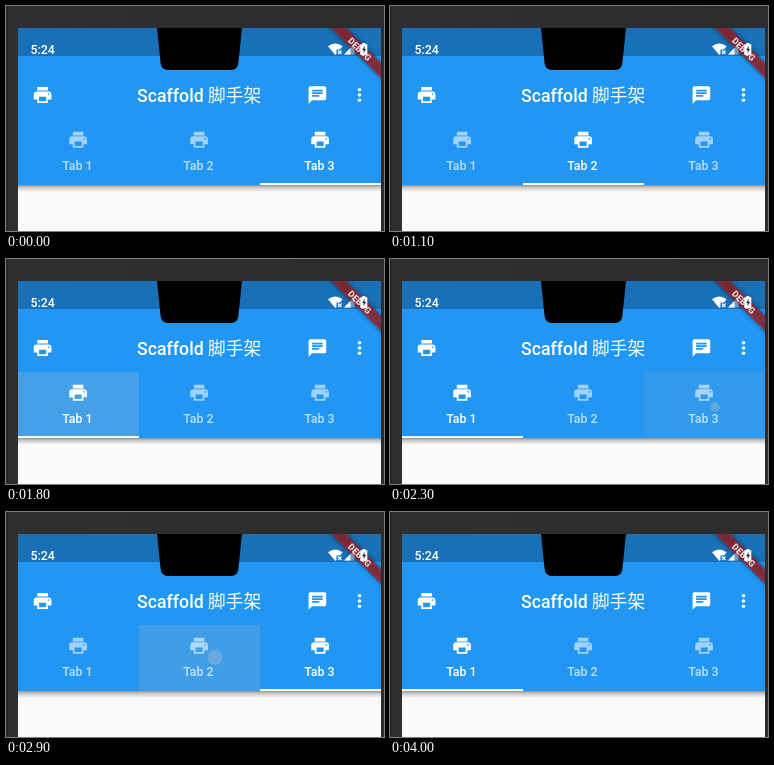
Write an HTML page that moves like this. It is 378x225 px and loops after 4500 ms.

```html
<!DOCTYPE html>
<html lang="en">
<head>
<meta charset="utf-8">
<title>Scaffold tabs</title>
<style>
  html, body { margin: 0; width: 100%; height: 100%; overflow: hidden; background: #2d2c2c; }
  svg { display: block; width: 378px; height: 225px; }
  text { font-family: Roboto, "Noto Sans CJK SC", "Noto Sans CJK", sans-serif; font-weight: 500; fill: #fff; }
  .small { font-size: 12.4px; }
  .title { font-size: 17.7px; }
  .cjk { font-family: "Noto Sans CJK SC", "Noto Sans CJK", sans-serif; font-weight: 400; }
  .ribbon { font-size: 9px; font-weight: 900; text-anchor: middle; fill-opacity: .8; }
  .tab text { text-anchor: middle; }
</style>
</head>
<body>
<svg viewBox="0 0 378 225">
  <defs>
    <linearGradient id="bezel" x2="1" y2="0">
      <stop offset="0" stop-color="#232222"/>
      <stop offset=".008" stop-color="#302f2f"/>
      <stop offset="1" stop-color="#2d2c2c"/>
    </linearGradient>
    <linearGradient id="shade" x2="0" y2="1">
      <stop offset="0" stop-color="#000" stop-opacity=".42"/>
      <stop offset=".35" stop-color="#000" stop-opacity=".2"/>
      <stop offset="1" stop-color="#000" stop-opacity="0"/>
    </linearGradient>
    <filter id="blur" x="-20%" y="-80%" width="140%" height="260%">
      <feGaussianBlur stdDeviation="2"/>
    </filter>
    <clipPath id="screen"><rect x="12" y="22" width="363" height="203"/></clipPath>
    <clipPath id="cell"><rect id="cellBox" y="113" width="121" height="66"/></clipPath>
    <path id="print" fill="#fff" d="M19 8H5c-1.66 0-3 1.34-3 3v6h4v4h12v-4h4v-6c0-1.66-1.34-3-3-3zm-3 11H8v-5h8v5zm3-7c-.55 0-1-.45-1-1s.45-1 1-1 1 .45 1 1-.45 1-1 1zm-1-9H6v4h12V3z"/>
  </defs>

  <rect width="378" height="225" fill="url(#bezel)"/>
  <g clip-path="url(#screen)">
    <rect x="12" y="22" width="363" height="203" fill="#fafafa"/>
    <rect x="12" y="179" width="363" height="7" fill="url(#shade)"/>
    <rect x="12" y="22" width="363" height="157" fill="#2196f3"/>
    <rect x="12" y="22" width="363" height="28" fill="#1970b6"/>

    <use href="#print" transform="translate(26 78.4) scale(.883)"/>
    <text class="title" x="131" y="96">Scaffold</text>
    <text class="title cjk" x="202" y="96">脚手架</text>
    <path fill="#fff" transform="translate(300.8 78.4) scale(.883)" d="M20 2H4c-1.1 0-1.99.9-1.99 2L2 22l4-4h14c1.1 0 2-.9 2-2V4c0-1.1-.9-2-2-2zM6 9h12v2H6V9zm8 5H6v-2h8v2zm4-6H6V6h12v2z"/>
    <g fill="#fff">
      <circle cx="353.5" cy="83.7" r="1.8"/>
      <circle cx="353.5" cy="89" r="1.8"/>
      <circle cx="353.5" cy="94.3" r="1.8"/>
    </g>

    <g id="ink" clip-path="url(#cell)">
      <rect id="glow" y="113" width="121" height="66" fill="#bcbcbc"/>
      <circle id="splash" fill="#c8c8c8"/>
    </g>
    <g id="tabs"></g>
    <rect id="bar" y="177.1" width="121" height="1.9" fill="#fff"/>

    <g transform="translate(375 22) rotate(45)">
      <rect x="-60" y="24.7" width="120" height="10.6" opacity=".5" filter="url(#blur)"/>
      <rect x="-60" y="24.7" width="120" height="10.6" fill="#b71c1c" fill-opacity=".66"/>
      <text class="ribbon" x="0" y="33.2">DEBUG</text>
    </g>

    <path d="M151 22H236L232.4 57Q231.7 64 225 64H162Q155.300 64 154.600 57Z"/>
    <text class="small" x="24.500" y="47.500">5:24</text>
    <path fill="#fff" d="M322 40.300Q329.300 34.500 336.600 40.300L334 43.400H330.500V47.800L329.300 49Z"/>
    <path stroke="#fff" stroke-width="1.200" d="M332 44.500l3.500 3.500m0-3.500l-3.500 3.500"/>
    <path fill="#fff" fill-opacity=".35" d="M338 48.500L348.500 38V48.500Z"/>
    <path fill="#fff" d="M338 48.500L344.500 42V48.500Z"/>
    <path fill="#fff" d="M356.300 37h3v1.300h2V48.700h-7V38.300h2z"/>
    <path fill="#333" d="M358.600 39.800l-2.500 4.200h1.500v3.200l2.500-4.300h-1.500z"/>
  </g>
</svg>
<script>
  const LOOP = 4500, STEP = 100, CELL = 121, LEFT = 12;
  // Each tap: visible from start, released at up, settled at end; held = press age at start.
  const taps = [
    { start: 800, up: 900, end: 1100, held: 40, from: 2, to: 1, x: 206, y: 148 },
    { start: 1500, up: 1600, end: 1900, held: 40, from: 1, to: 0, x: 86, y: 148 },
    { start: 2300, up: 2400, end: 2600, held: 50, from: 0, to: 2, x: 325, y: 148 },
    { start: 2900, up: 2900, end: 3100, held: 100, from: 2, to: 1, x: 209, y: 145.5 },
    { start: 3700, up: 3800, end: 4000, held: 30, from: 1, to: 0, x: 91.700, y: 149.700 }
  ];
  const $ = id => document.getElementById(id);
  const set = (el, attrs) => {
    for (const key in attrs) el.setAttribute(key, attrs[key]);
  };
  const clamp = v => Math.min(1, Math.max(0, v));
  const cellX = i => LEFT + CELL * i;

  // cubic-bezier(.25, .1, .25, 1)
  function ease(x) {
    if (x <= 0 || x >= 1) return clamp(x);
    const curve = (a, b, s) => 3 * a * s * (1 - s) ** 2 + 3 * b * s * s * (1 - s) + s ** 3;
    let lo = 0, hi = 1;
    for (let i = 0; i < 20; i++) {
      const mid = (lo + hi) / 2;
      if (curve(.25, .25, mid) < x) lo = mid; else hi = mid;
    }
    return curve(.1, 1, lo);
  }

  $("tabs").innerHTML = [0, 1, 2].map(i => `
    <g class="tab" transform="translate(${CELL * i} 0)">
      <use href="#print" transform="translate(61.500 123.200) scale(.883)"/>
      <text class="small" x="71.500" y="164.300">Tab ${i + 1}</text>
    </g>`).join("");
  const tabs = [...document.querySelectorAll(".tab")];

  function drawInk(tap, t) {
    const active = tap && t < tap.end;
    $("ink").style.display = active ? "" : "none";
    if (!active) return;
    const age = t - tap.start + tap.held;
    const since = Math.max(0, t - tap.up);
    const fade = 1 - since / (tap.end - tap.up);
    const x = cellX(tap.to);
    set($("cellBox"), { x });
    set($("glow"), { x, opacity: .4 * clamp(age / 200) * fade });
    set($("splash"), { cx: tap.x, cy: tap.y, r: 1.9 + .056 * age + 1.3 * since, opacity: .3 * fade });
  }

  function draw(now) {
    const t = Math.floor(now % LOOP / STEP) * STEP;
    const tap = taps.filter(p => t >= p.start).pop();
    const { from, to, up } = tap || { from: 2, to: 2, up: 0 };
    const p = ease((t - up) / 200);
    const jump = Math.abs(to - from) > 1;

    set($("bar"), { x: cellX(from + (to - from) * p) });
    tabs.forEach((tab, i) => {
      let lit = 0;
      if (i === from) lit = jump && p < 1 ? 1 : 1 - p;
      if (i === to) lit = Math.max(lit, p);
      set(tab.children[0], { opacity: .58 + .42 * lit });
      set(tab.children[1], { opacity: .7 + .3 * lit });
    });
    drawInk(tap, t);
  }

  const begin = performance.now();
  function tick() {
    draw(performance.now() - begin);
    requestAnimationFrame(tick);
  }
  tick();
</script>
</body>
</html>
```
